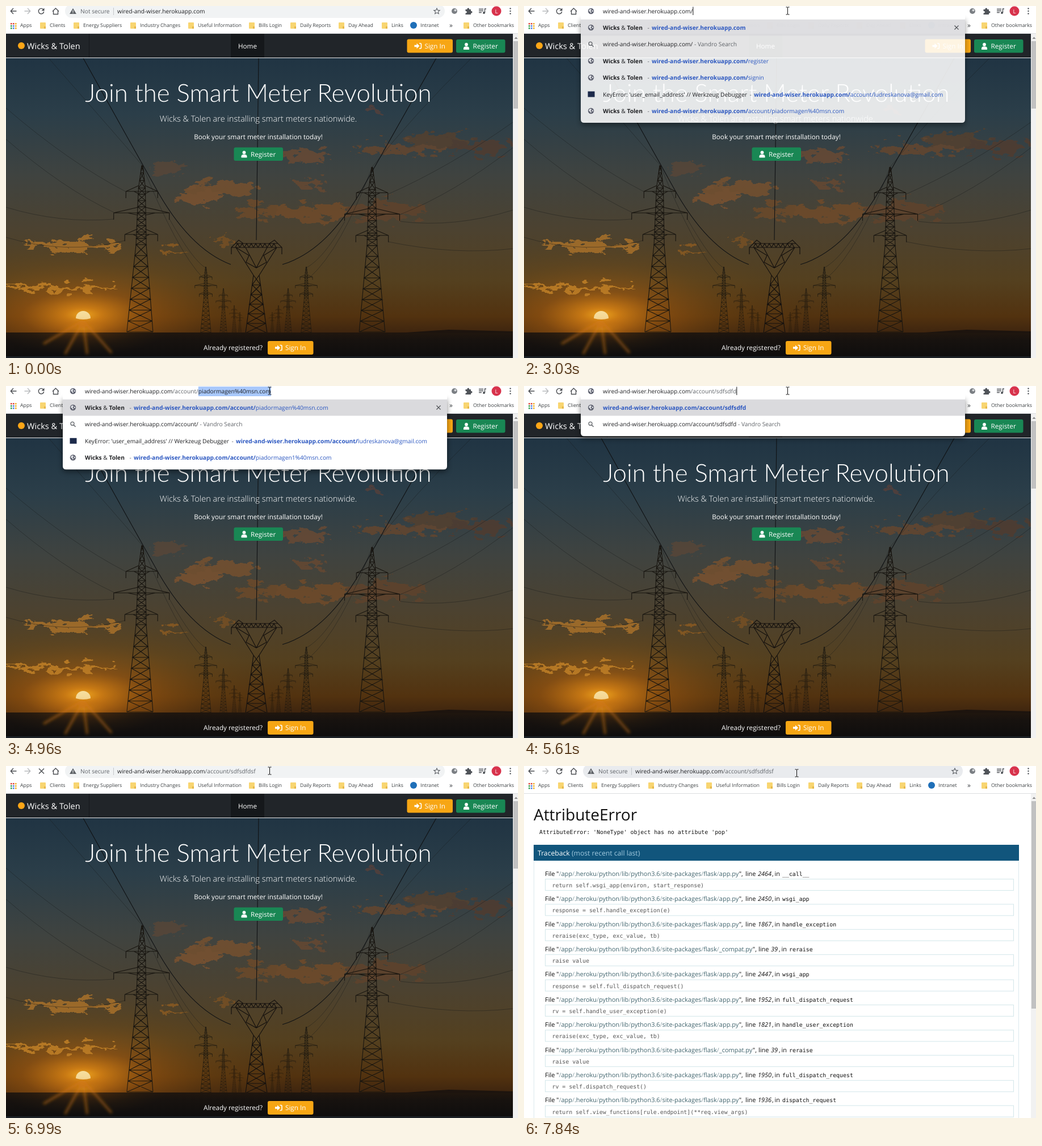
These frames come from a looping animation (902 by 621 pixels, 8 s). An HTML page:

```html
<!DOCTYPE html>
<html lang="en">
<head>
<meta charset="utf-8">
<title>Browser session</title>
<style>
html, body { margin: 0; width: 100%; height: 100%; overflow: hidden; background: #fff; }
svg { position: absolute; left: 0; top: 0; font-family: 'Open Sans', 'Noto Sans', sans-serif; text-rendering: geometricPrecision; }
.mono { font-family: 'DejaVu Sans Mono', monospace; }
.head { font-family: Lato, 'Open Sans', sans-serif; font-weight: 300; }
.b { font-weight: 700; }
</style>
</head>
<body>
<svg id="home" width="902" height="621"></svg>
<svg id="ui" width="902" height="621"></svg>
<script>
const LOOP = 8000, SIZE = 10.22, BLUE = '#2a56c0', GREY = '#5f6368', INK = '#202124';
const HOST = 'wired-and-wiser.herokuapp.com', SITE = 'Wicks &amp; Tolen';
const USER = 'piadormagen', DONE = `/account/${USER}%40msn.com`;

const rect = (x, y, w, h, fill, more = '') => `<rect x="${x}" y="${y}" width="${w}" height="${h}" fill="${fill}" ${more}/>`;
const disc = (x, y, r, fill, more = '') => `<circle cx="${x}" cy="${y}" r="${r}" fill="${fill}" ${more}/>`;
const oval = (x, y, rx, ry, fill, more = '') => `<ellipse cx="${x}" cy="${y}" rx="${rx}" ry="${ry}" fill="${fill}" ${more}/>`;
const fill = (d, color, more = '') => `<path d="${d}" fill="${color}" ${more}/>`;
const line = (d, color, w = 1, more = '') => `<path d="${d}" fill="none" stroke="${color}" stroke-width="${w}" ${more}/>`;
const text = (x, y, s, size, color, more = '') => `<text x="${x}" y="${y}" font-size="${size}" fill="${color}" ${more}>${s}</text>`;
const span = (s, color, cls = '') => `<tspan fill="${color}" class="${cls}">${s}</tspan>`;
const at = (x, y, s) => `<g transform="translate(${x} ${y})">${s}</g>`;

const pen = document.createElement('canvas').getContext('2d');
pen.font = "100px 'Open Sans', 'Noto Sans', sans-serif";
const width = s => pen.measureText(s).width * SIZE / 100;

// ---------- home page ----------
const MID = 'text-anchor="middle"';
const person = disc(0, -3, 2.9, '#fff') + fill('M-5 6v-2q0-3.5 3.5-3.5h3q3.5 0 3.5 3.5v2z', '#fff');
const enter = fill('M-6-1.8h4v-3l5 4.8-5 4.8v-3h-4z', '#fff') + line('M2.5-4.5h2q1.5 0 1.5 1.5v6q0 1.5-1.5 1.5h-2', '#fff', 1.6);
const signIn = (x, y) => rect(x, y, 80.5, 24, '#f7a614', 'rx="3"') + at(x + 19, y + 12, enter) + text(x + 31, y + 16.3, 'Sign In', 11.7, '#fff');
const register = (x, y) => rect(x, y, 86.5, 23.5, '#198754', 'rx="3"') + at(x + 18, y + 12, person) + text(x + 29.5, y + 16.2, 'Register', 11.7, '#fff');

// braced mast between two heights, given half widths
function lattice(x, y0, w0, y1, w1, n) {
  let d = `M${x - w0} ${y0}L${x - w1} ${y1}M${x + w0} ${y0}L${x + w1} ${y1}`;
  for (let i = 0; i < n; i++) {
    const [a, b] = [i / n, (i + 1) / n];
    const [ya, yb] = [a, b].map(k => y0 + (y1 - y0) * k);
    const [wa, wb] = [a, b].map(k => w0 + (w1 - w0) * k);
    d += `M${x - wa} ${ya}L${x + wb} ${yb}H${x - wb}L${x + wa} ${ya}`;
  }
  return d;
}
const arm = (y, w) => `M${-w} ${y + 12}V${y}L-6 ${y - 10}M${w} ${y + 12}V${y}L6 ${y - 10}M${-w} ${y}H${w}M${-w / 2} ${y}L-6 ${y + 4}M${w / 2} ${y}L6 ${y + 4}`;
const mast = lattice(0, 0, 1, 40, 6, 3) + lattice(0, 40, 6, 140, 9, 9) + lattice(0, 140, 9, 294, 23, 8) + arm(46, 28) + arm(84, 49) + arm(122, 29);
const pylon = (x, y, s, w = 1.1, lean = 0) =>
  `<g transform="translate(${x} ${y}) skewX(${lean}) scale(${s})">${line(mast, '#17140f', w / s ** 0.7)}</g>`;

const gate = lattice(441, 475, 5, 577, 19, 6) +
  'M397 438V426L410 413L418 419H464L473 413L486 426V438M397 426H486M404 419H479' +
  'M405 426L436 475M477 426L446 475M422 426L441 462L460 426M405 426L428 440L423 452L441 462L459 452L454 440L477 426' +
  Array.from({ length: 9 }, (_, i) => `M${404 + i * 8} 426l4-7l4 7`).join('');

const wires = 'M136 92L262 318Q322 428 396 456M758 92L628 322Q566 432 487 456M445 92L441 413';
const thinWires = 'M0 180Q110 275 212 328M0 235Q100 322 190 364M0 355Q95 384 190 376M0 408Q105 440 209 414' +
  'M75 92Q170 200 240 281M893 205Q780 285 673 332M893 250Q790 330 694 368M893 360Q790 392 694 380M893 428Q790 440 674 416' +
  'M820 92Q720 190 645 284M288 376Q330 450 352 462M597 380Q560 445 529 462M240 281Q300 430 347 480M645 284Q590 430 534 480';

const clouds = [
  [765, 240, 62, 15, '#54402f'], [700, 252, 82, 10, '#64462f'], [835, 248, 56, 11, '#503c30'], [528, 266, 46, 12, '#684a34'],
  [380, 322, 62, 13, '#75502f'], [342, 336, 42, 11, '#7a5230'], [286, 286, 32, 12, '#574638'], [534, 315, 30, 9, '#664832'],
  [448, 362, 40, 10, '#6c4a2a'], [542, 364, 60, 14, '#704b2a'], [668, 362, 68, 17, '#5f422c'], [122, 423, 90, 8, '#a8702a'],
  [298, 431, 26, 4, '#8a5a22'], [380, 413, 19, 5, '#765024'], [95, 497, 98, 5, '#c08027'], [655, 183, 9, 4, '#54403c']
].map(c => oval(...c)).join('');

const stops = (...list) => list.map(([o, c, a = 1]) => `<stop offset="${o}" stop-color="${c}" stop-opacity="${a}"/>`).join('');

home.innerHTML = `<defs>
  <linearGradient id="sky" x2="0" y2="1">${stops([0, '#203443'], [.2, '#2b3e49'], [.42, '#3f4340'], [.62, '#4c4230'], [.8, '#54401f'], [.93, '#52320f'], [1, '#3a220f'])}</linearGradient>
  <linearGradient id="land" x2="0" y2="1">${stops([0, '#20160e'], [.3, '#17120f'], [1, '#0e0d0d'])}</linearGradient>
  <radialGradient id="glow">${stops([0, '#ffb320', .95], [.09, '#f59415', .75], [.3, '#c26a10', .42], [.65, '#8c540f', .18], [1, '#6a4512', 0])}</radialGradient>
  <filter id="rough" x="-10%" y="-10%" width="120%" height="120%" color-interpolation-filters="sRGB"><feTurbulence type="fractalNoise" baseFrequency=".04 .08" numOctaves="4" seed="4"/><feDisplacementMap in="SourceGraphic" scale="46" xChannelSelector="R" yChannelSelector="G"/><feGaussianBlur stdDeviation=".7"/></filter>
  <filter id="soft" x="-30%" y="-30%" width="160%" height="160%"><feGaussianBlur stdDeviation="2.5"/></filter>
  <clipPath id="photo"><rect y="92" width="893" height="529"/></clipPath>
</defs>
<g clip-path="url(#photo)">` +
  rect(0, 92, 893, 490, 'url(#sky)') +
  oval(136, 545, 360, 140, 'url(#glow)') +
  `<g filter="url(#rough)" opacity=".85">${clouds}</g>` +
  fill('M123 551a13 13 0 0 1 26 0q-13 4-26 0z', '#ffe9a8') +
  line(thinWires, '#17181a', .7, 'opacity=".6"') + line(wires, '#101214', 1.1) +
  pylon(240, 281, 1, 1.1, -.8) + pylon(645, 284, .99) + line(gate, '#15110e', 1.2) +
  pylon(352, 460, .395, .8) + pylon(529, 460, .395, .8) + pylon(383, 498, .27, .6) + pylon(497, 498, .27, .6) +
  pylon(402, 528, .17, .4) + pylon(480, 528, .17, .4) + pylon(412, 540, .12, .3) + pylon(469, 540, .12, .3) +
  rect(0, 576, 893, 45, 'url(#land)') + fill('M690 577L780 571L893 574V577z', '#1d140e') +
  oval(136, 570, 150, 46, 'url(#glow)', 'opacity=".4"') +
  `<g filter="url(#soft)">${line('M136 556L104 614M137 556L186 612M136 556L143 614M134 556L66 596', '#d87a18', 4, 'opacity=".5"')}</g>` +
  rect(0, 618, 893, 3, '#1c2126') + `</g>` +
  rect(0, 49, 893, 43, '#212529') + rect(0, 91, 893, 1, '#e8eaec') + rect(396, 49, 59, 42, '#15181b') + rect(146, 49, 1, 42, '#15181b') +
  disc(27, 70, 6, '#ffa616') + text(37, 75.6, SITE, 14.6, '#fff') + text(425.5, 75.2, 'Home', 11.7, '#fff', MID) +
  signIn(706.5, 58.5) + register(793, 59) +
  text(444.5, 169, 'Join the Smart Meter Revolution', 43.8, '#fff', MID + ' class="head"') +
  text(444.5, 203.5, SITE + ' are installing smart meters nationwide.', 14.6, '#fff', MID + ' font-weight="300"') +
  text(444.5, 234.5, 'Book your smart meter installation today!', 11.7, '#fff', MID) +
  register(401.5, 249.5) + text(348, 606.5, 'Already registered?', 11.7, '#fff') + signIn(461, 591);

// ---------- browser frame ----------
const folder = x => rect(x, 29, 10, 11, '#f8d571', 'rx="1"') + rect(x + 7, 36, 3, 4, '#e6b84a');
const marks = [[77, 'Clients'], [136, 'Energy Suppliers'], [236, 'Industry Changes'], [338, 'Useful Information'], [445, 'Bills Login'],
  [518, 'Daily Reports'], [603, 'Day Ahead'], [679, 'Links'], [823, 'Other bookmarks']];
const dots = ['#e04a3c', '#e04a3c', '#f0b42c', '#35a052', '#4a80e8', '#f0b42c', '#35a052', '#4a80e8', '#f0b42c']
  .map((c, i) => rect(8 + i % 3 * 4, 30 + Math.floor(i / 3) * 4, 2.6, 2.6, c)).join('');
const label = (x, s) => text(x, 37.3, s, 8.75, '#3c4043');

const frame = rect(0, 0, 902, 48, '#fff') + rect(0, 48, 902, 1, '#dcdee0') +
  line('M18.5 9H8.5M13 4L8.3 9L13 14', '#4a4d51', 1.4) + line('M32.5 9H42.5M38 4L42.7 9L38 14', '#b8babd', 1.4) +
  line('M82 9.5L87.5 4L93 9.5M83.5 8.5V14.5H91.5V8.5', '#4a4d51', 1.4) +
  disc(790, 9, 5, '#7b7f84') + disc(791.5, 7.5, 2, '#d5d7d9') +
  fill('M809.5 6h3a1.9 1.9 0 1 1 3.6 0h2.9v3a1.9 1.9 0 1 1 0 3.6v2.4h-9.5v-2.6a1.8 1.8 0 1 0 0-3.4z', '#505459') +
  line('M833 5.5H841M833 8.5H841M833 11.5H838M843.5 12V5H846', '#505459', 1.4) + disc(842, 12, 2, '#505459') +
  disc(864, 9, 8.5, '#d8334c') + text(864, 12.5, 'L', 9.5, '#fff', MID) +
  [4.5, 9, 13.5].map(y => disc(888.5, y, 1.2, '#505459')).join('') +
  dots + label(25, 'Apps') + marks.map(([x, s]) => folder(x - 17) + label(x, s)).join('') +
  disc(718, 34, 6, '#1f6fb8') + label(730, 'Intranet') + text(781, 37.5, '»', 12, '#3c4043');

const scrollbar = end => rect(893, 49, 9, 572, '#f1f1f1') + rect(894, 62, 8, end - 62, '#c1c1c1') + fill('M895.5 58l3-3.5 3 3.5z', '#8a8a8a');
const cross = (x, y, r, w) => line(`M${x - r} ${y - r}L${x + r} ${y + r}M${x + r} ${y - r}L${x - r} ${y + r}`, '#4a4d51', w);
const reload = line('M66 6.5A4.7 4.7 0 1 0 66.7 10', '#4a4d51', 1.4) + fill('M67.5 3.5v5h-5z', '#4a4d51');
const warning = fill('M118 4L124 14H112z', GREY) + rect(117.4, 7.5, 1.2, 3.2, '#fff') + rect(117.4, 11.6, 1.2, 1.2, '#fff');
const info = line('M118 8.5V12M118 6V7.3', GREY, 1.2) + disc(118, 9, 5, 'none', `stroke="${GREY}"`);
const globe = y => disc(118, y, 5.2, '#5f6270') + fill(`M115 ${y - 3}l3-1 1 2-2 2 2 1-1 3-2-3-2-1zM120 ${y - 2}l2 1v2l-2 0z`, '#dfe1e5');
const lens = y => line(`M119 ${y + 1}L122.5 ${y + 4.5}`, GREY, 1.4) + disc(117, y - 1, 3, 'none', `stroke="${GREY}" stroke-width="1.2"`);
const star = line('M759 4l1.5 3.4 3.7.3-2.8 2.4.9 3.6-3.3-1.9-3.3 1.9.9-3.6-2.8-2.4 3.7-.3z', GREY, 1.1);
const squares = line('M730 5h3v3h-3zM736 5h3v3h-3zM730 11h3v3h-3zM736 11h3v3h-3z', GREY, 1.3);
const ibeam = (x, y) => line(`M${x - 3} ${y - 6.5}h2.5l.5.5.5-.5h2.5M${x} ${y - 6}v12M${x - 3} ${y + 6.5}h2.5l.5-.5.5.5h2.5`, '#111', 1);
const arrow = (x, y) => at(x, y, fill('M0 0V15L3.5 11.7L6 17.3L8.3 16.3L5.9 10.9H10.7z', '#fff', 'stroke="#111" stroke-width=".9"'));

// ---------- suggestions ----------
const link = (bold, rest = '') => span(HOST + bold, BLUE, 'b') + span(rest, BLUE);
const pageRow = (...p) => y => globe(y) +
  text(139, y + 4, SITE.replace(/(\w+) &amp; (\w+)/, '<tspan class="b">$1</tspan> &amp; <tspan class="b">$2</tspan>'), SIZE, INK) +
  text(217.5, y + 4, '-', SIZE, GREY) + text(225, y + 4, link(...p), SIZE, BLUE);
const debugRow = (...p) => y => rect(112.5, y - 5, 12, 10, '#1c2a4a') +
  text(139, y + 4, "KeyError: 'user_email_address' // Werkzeug Debugger", SIZE, INK) +
  text(397.5, y + 4, '-', SIZE, GREY) + text(405, y + 4, link(...p), SIZE, BLUE);
const searchRow = tail => y => lens(y) + text(139, y + 4, HOST + tail + span(' - Vandro Search', GREY), SIZE, INK);
const linkRow = tail => y => globe(y) + text(139, y + 4, link(tail), SIZE, BLUE);

function panel(rows, alpha) {
  const end = 59 + 29.4 * (rows.length - 1);
  return fill(`M100 20H777V${end - 6}q0 6-6 6H106q-6 0-6-6z`, '#fff', `opacity="${alpha}" style="filter:drop-shadow(0 4px 5px #0007)"`) +
    rect(100, 23.5, 677, 29, '#dadadd', `opacity="${alpha}"`) +
    rows.map((row, i) => row(38 + 29.4 * i)).join('') + (rows.length > 2 ? cross(762, 38, 3.5, 1.2) : '');
}
function rowsFor(tail) {
  if (tail === '/') return [pageRow(''), searchRow(tail), pageRow('/', 'register'), pageRow('/', 'signin'),
    debugRow('/', 'account/ludreskanova@gmail.com'), pageRow('/', DONE.slice(1))];
  if (tail.length > 9) return [linkRow(tail), searchRow(tail)];
  const rest = s => ('/account/' + s).slice(tail.length);
  return [pageRow(tail, DONE.slice(tail.length)), searchRow(tail),
    debugRow(tail, rest('ludreskanova@gmail.com')), pageRow(tail, rest(USER + '1%40msn.com'))];
}

// time and number of characters typed after the host
const TAIL = '/account/sdfsdfdsf';
const keys = [[3030, 1], [3190, 2], [3340, 3], [3490, 4], [3570, 5], [3650, 6], [3800, 7], [3970, 8], [4960, 9],
  [5280, 10], [5360, 11], [5440, 13], [5530, 14], [5610, 16], [5760, 17], [5830, 18]];
const typed = t => TAIL.slice(0, keys.filter(k => k[0] <= t).reduce((n, k) => k[1], 0));

const REST = '#f1f3f4', HOVER = '#e9ebee';
const pill = color => rect(104, -3, 669, 24, color, 'rx="12"');
const ring = a => rect(105, -2, 667, 22, '#fff', `rx="11" stroke="#a3c4f8" stroke-width="2" opacity="${a}"`);
const address = (x, s) => text(x, 13.2, s, SIZE, INK);
const select = (x, w) => rect(x, 1, w, 17, '#a8c8fb');
const caret = x => rect(x, 1.5, 1, 14.5, '#111');
const unsafe = warning + text(131, 13.2, 'Not secure', SIZE, GREY) + rect(189, 3, 1, 13, '#c4c7ca');
const steps = (t, from, gap, n) => Math.min(n, Math.floor((t - from) / gap) + 1);

function addressBar(t) {
  const path = span(TAIL, GREY);
  if (t >= 6990) return pill(t < 7530 ? REST : HOVER) + unsafe + address(196, HOST + path) + star;
  if (t >= 6760) return pill(REST) + info + address(130, HOST + path) + squares + star;
  if (t >= 3030) {
    const tail = typed(t), x = 139 + width(HOST + tail);
    const rest = tail.length > 1 && tail.length < 10 ? DONE.slice(tail.length) : '';
    return rect(100, 0, 677, 23.5, '#fff') + globe(9) + (rest ? select(x, width(rest)) : t < 6380 ? caret(x) : '') +
      address(139, HOST + (tail.length > 8 ? span(tail, GREY) + rest : tail + rest));
  }
  const focus = t < 1170 ? 0 : steps(t, 1170, 77, 5) / 5;
  return pill(t < 780 ? REST : HOVER) + (focus ? ring(focus) : '') +
    (t >= 1250 && t < 2080 ? select(196, width(HOST)) : '') + (t >= 2080 && t < 2650 ? caret(351) : '') +
    unsafe + address(196, HOST) + (focus ? squares : '') + star;
}

// ---------- error page ----------
const calls = [
  [2464, '__call__', 'return self.wsgi_app(environ, start_response)'],
  [2450, 'wsgi_app', 'response = self.handle_exception(e)'],
  [1867, 'handle_exception', 'reraise(exc_type, exc_value, tb)'],
  [39, 'reraise', 'raise value'],
  [2447, 'wsgi_app', 'response = self.full_dispatch_request()'],
  [1952, 'full_dispatch_request', 'rv = self.handle_user_exception(e)'],
  [1821, 'handle_user_exception', 'reraise(exc_type, exc_value, tb)'],
  [39, 'reraise', 'raise value'],
  [1950, 'full_dispatch_request', 'rv = self.dispatch_request()'],
  [1936, 'dispatch_request', 'return self.view_functions[rule.endpoint](**req.view_args)']
];
const mono = (x, y, s, color) => text(x, y, s, 9.88, color, 'class="mono"');
function callRow([num, name, code], y) {
  const compat = num === 39, x = compat ? 413 : 390, after = x + (compat ? 40.5 : 51.5);
  const file = `/app/.heroku/python/lib/python3.6/site-packages/flask/${compat ? '_compat' : 'app'}.py`;
  const put = (x, s, more) => text(x, y + 3.7, s, 10.95, '#111', more);
  return put(37, 'File') + put(57, `"${span(file.replaceAll('/', span('/', '#8aa0a6')), '#41656e')}",`) + put(x, 'line') +
    put(x + 22, num, 'font-style="italic"') + put(after - 4.5, ',') + put(after, 'in') + mono(after + 13.5, y + 3.7, name, '#111') +
    rect(37.5, y + 9.5, 825, 20, '#fff', 'stroke="#d3e7ea"') + mono(49.5, y + 24, code, '#555');
}
function errorPage(ready) {
  const shift = ready ? 0 : 16, top = ready ? 139 : 150, end = ready ? 167 : 184;
  return rect(0, 49, 902, 572, '#fff') + rect(17.5, end, 854, 500, '#fff', 'stroke="#dbe9ee"') + rect(17, top, 855, end - top, '#11557c') +
    mono(27, ready ? 120 : 130.5, "AttributeError: 'NoneType' object has no attribute 'pop'", '#111') +
    (ready ? text(17, 95.5, 'AttributeError', 28, '#111') + text(24, 157.7, 'Traceback', 12.2, '#fff', 'font-weight="500"') +
      text(84, 157.7, '(most recent call last)', 12.2, '#a3cbe0') : '') +
    calls.map((c, i) => callRow(c, 190 + shift + 44.4 * i)).join('') + scrollbar(ready ? 428 : 420);
}

function cursor(t) {
  if (t < 210) return '';
  if (t < 940) {
    const left = 1 - (steps(t, 210, 81, 10) - 1) / 9, e = 1 - left * left;
    const x = 464.5 + 35 * (1 - e), y = 8.5 + 446 * (1 - e);
    return y < 21 ? ibeam(x, y) : arrow(x, y);
  }
  const k = t < 7530 ? 0 : steps(t, 7530, 77, 5) / 5;
  return ibeam(464.5 + 16 * k, 8.5 + 4 * k);
}

function scene(t) {
  const page = t < 7070 ? scrollbar(181) : errorPage(t >= 7160);
  const list = t >= 3030 && t < 6840 ? panel(rowsFor(typed(t)), t < 3110 ? .88 : 1) : '';
  const loading = t >= 6760 && t < 7160;
  return page + frame + (loading ? cross(62.5, 9, 4.5, 1.4) : reload) + list + addressBar(t) + cursor(t);
}

let last = '';
function tick() {
  const now = scene(performance.now() % LOOP);
  if (now !== last) ui.innerHTML = last = now;
  requestAnimationFrame(tick);
}
tick();
</script>
</body>
</html>
```
